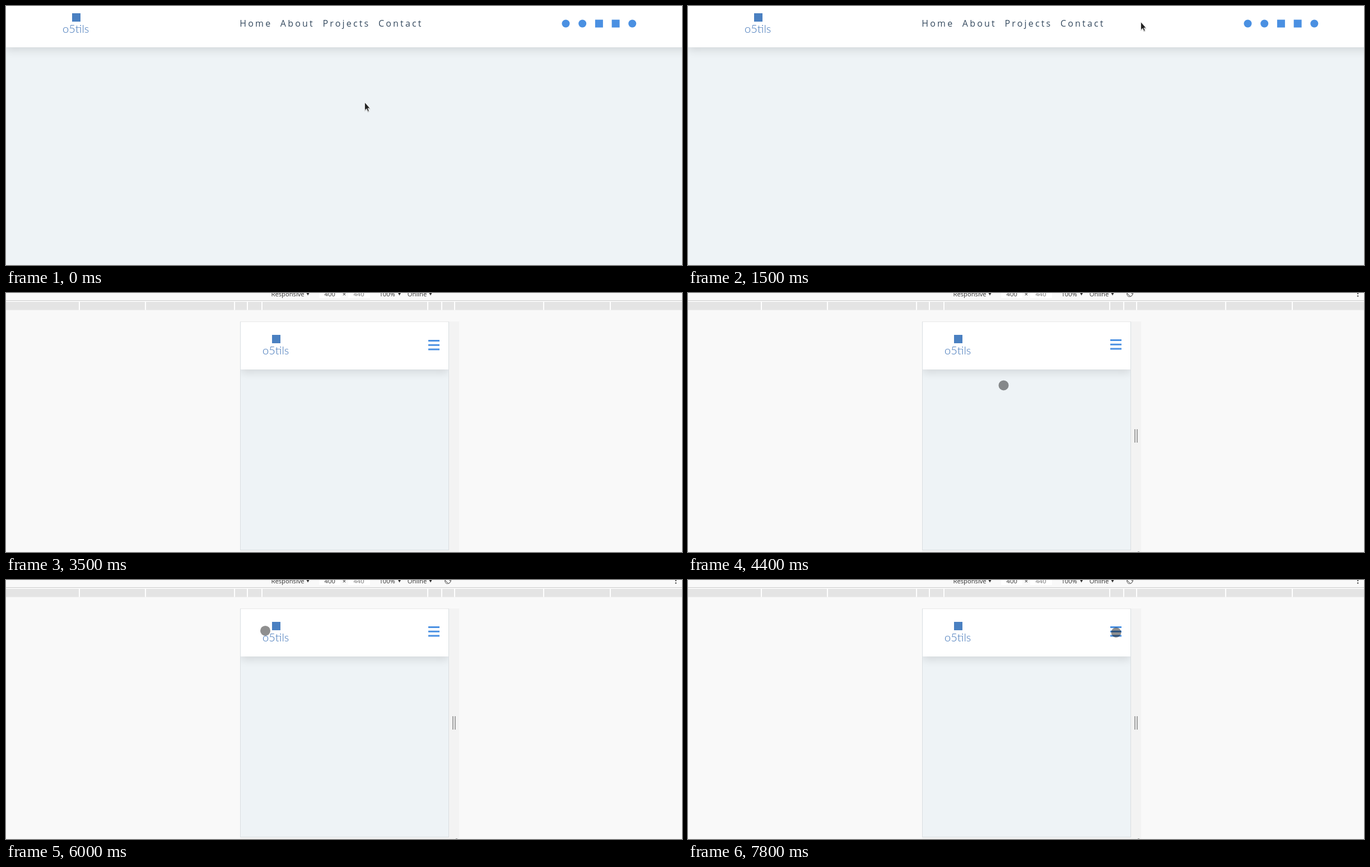
An HTML page for the animation above (8 s loop, 1207x464 px).

```html
<!DOCTYPE html>
<html lang="en">
<head>
<meta charset="utf-8">
<title>Responsive navigation bar</title>
<style>
  html, body { margin: 0; width: 100%; height: 100%; overflow: hidden; }
  #stage { position: relative; width: 1207px; height: 464px; overflow: hidden; background: #f9f9f9; }
  .scene, svg { position: absolute; left: 0; top: 0; width: 1207px; height: 464px; }
  .page { position: absolute; overflow: hidden; background: #eef3f6; }
  .bar { position: absolute; left: 0; top: 0; background: #fff; box-shadow: 0 5px 15px rgba(0, 0, 0, .12); }
  #wide .page { left: 0; top: 0; width: 1207px; height: 464px; }
  #wide .bar { width: 1240px; height: 74px; }
  #phone .page { left: 418px; top: 51px; width: 371px; height: 408px; border: 1px solid #d9dee1; border-top-color: #e8e8e8; }
  #phone .bar { width: 371px; height: 85px; }
  nav {
    position: absolute; left: 417.2px; top: 20px; display: flex; gap: 14.5px;
    font: 16px/22px "Open Sans", "Noto Sans", sans-serif; letter-spacing: 3.2px; color: #34495e;
  }
  .brand { font: 300 20px Lato, "Open Sans", sans-serif; fill: #3f74b8; }
  .tools { font: 11.2px "Open Sans", "Noto Sans", sans-serif; fill: #333; }
  .accent { fill: #4a90e2; }
</style>
</head>
<body>
<div id="stage">
  <div class="scene" id="wide">
    <div class="page"><div class="bar"></div></div>
    <nav><span>Home</span><span>About</span><span>Projects</span><span>Contact</span></nav>
    <svg viewBox="0 0 1207 464">
      <defs>
        <g id="logo">
          <rect x="118" y="13" width="15" height="15" fill="#4a80c1"/>
          <text class="brand" x="101" y="48">o5tils</text>
        </g>
      </defs>
      <use href="#logo"/>
      <g class="accent" id="social"></g>
      <path id="arrow" d="M.5 .5V15L3.8 12L6.1 17L8.3 16L6.1 11.2H10Z" fill="#222" stroke="#fff" stroke-width=".8"
        style="filter: drop-shadow(.5px 1px .7px rgba(0,0,0,.3))"/>
    </svg>
  </div>

  <div class="scene" id="phone">
    <svg viewBox="0 0 1207 464">
      <path d="M0 13.5H1207" stroke="#ccc"/>
      <rect y="16" width="1207" height="14.5" fill="#e4e4e4"/>
      <g id="ticks" stroke="#fff" stroke-width="2"></g>
      <path d="M790 51H809V464H418V460H790Z" fill="#f3f3f3"/>
      <path d="M559 0H597V9H559ZM611 0H650V9H611Z" fill="#fff"/>
      <g class="tools">
        <text x="473.6" y="6">Responsive</text>
        <text x="568.6" y="6">400</text>
        <text x="600.8" y="6">×</text>
        <text x="620.4" y="6" fill="#777">440</text>
        <text x="666.4" y="6">100%</text>
        <text x="716.8" y="6">Online</text>
        <path d="M536.5 0h5l-2.5 4.5zM700 0h5l-2.5 4.5zM755.5 0h5l-2.5 4.5z"/>
      </g>
    </svg>
    <div class="page"><div class="bar"></div></div>
    <svg viewBox="0 0 1207 464">
      <use href="#logo" x="357" y="62"/>
      <path id="menu" class="accent" d="M754 0h20v3h-20zM754 7.7h20v3h-20zM754 15.4h20v3h-20z"/>
      <g id="extras">
        <path d="M798 244V268M802 244V268" stroke="#999" stroke-width="1.8"/>
        <g fill="#555">
          <circle cx="1196" cy="1" r="1.3"/><circle cx="1196" cy="5.5" r="1.3"/>
          <rect x="803" y="463" width="3" height="1" fill="#999"/>
        </g>
        <g fill="none" stroke="#666" stroke-width="1.1">
          <rect x="-3" y="-4.5" width="6" height="9" rx="1" transform="translate(789 1.5) rotate(-45)"/>
          <path d="M783.5 1a6 6 0 0 0 5 6M794.5 2a6 6 0 0 0-5-6"/>
        </g>
      </g>
      <circle id="touch" r="9" fill="#000" fill-opacity=".44"/>
    </svg>
  </div>
</div>

<script>
const LOOP = 8000, STEP = 100, PHONE_AT = 3500, EXTRAS_AT = 3600;
const $ = id => document.getElementById(id);

// Each move runs between two times to a point; "bend" curves the path.
const arrow = {
  el: $("arrow"), from: 0, until: 2300, home: [640, 172],
  moves: [
    { time: [300, 600], to: [209, 58] },
    { time: [800, 1200], to: [411, 50], bend: [-110, -26] },
    { time: [1400, 1500], to: [808, 28] },
    { time: [1600, 1700], to: [1060, 9] },
    { time: [1800, 2200], to: [708, 365], bend: [1135, 60] }
  ]
};
const touch = {
  el: $("touch"), from: 3900, until: LOOP, home: [645, 370],
  moves: [
    { time: [4000, 4100], to: [709, 234] },
    { time: [4200, 4900], to: [722, 94], bend: [350, 94] },
    { time: [5100, 5300], to: [771, 102], bend: [803, 96] },
    { time: [5400, 6300], to: [473, 101], bend: [376, 78] },
    { time: [6300, 6600], to: [709.5, 90] },
    { time: [6700, 7100], to: [764.5, 91] },
    { time: [7200, 7800], to: [764.5, 94] }
  ]
};

// Device widths give the breakpoints, mirrored about the middle.
$("ticks").innerHTML = [320, 375, 425, 768, 1024]
  .flatMap(w => [604.7 - w * .4627, 604.7 + w * .4627])
  .map(x => `<path d="M${Math.round(x)} 16V30.5"/>`).join("");

$("social").innerHTML = ["round", "round", "square", "square", "round"].map((shape, i) =>
  `<rect x="${992.5 + 29.7 * i}" y="24.5" width="14" height="14" rx="${shape === "round" ? 7 : 0}"/>`).join("");

function show(el, on) { el.style.display = on ? "" : "none"; }

function curve(a, b, c, k) {
  return a.map((v, i) => (1 - k) ** 2 * v + 2 * k * (1 - k) * b[i] + k * k * c[i]);
}

function position(pointer, t) {
  let at = pointer.home;
  for (const { time: [start, end], to, bend } of pointer.moves) {
    if (t <= start) break;
    const k = Math.min(1, (t - start) / (end - start));
    const middle = bend || at.map((v, i) => (v + to[i]) / 2);
    at = curve(at, middle, to, k);
  }
  return at;
}

function place(pointer, t) {
  show(pointer.el, t >= pointer.from && t < pointer.until);
  pointer.el.setAttribute("transform", `translate(${position(pointer, t)})`);
}

function draw(time) {
  const t = Math.floor(time / STEP) * STEP;
  show($("wide"), t < PHONE_AT);
  show($("phone"), t >= PHONE_AT);
  show($("extras"), t >= EXTRAS_AT);
  $("menu").setAttribute("transform", `translate(0 ${t < EXTRAS_AT ? 84 : 83})`);
  place(arrow, t);
  place(touch, t);
}

const start = performance.now();
function tick() {
  draw((performance.now() - start) % LOOP);
  requestAnimationFrame(tick);
}
tick();
</script>
</body>
</html>
```
